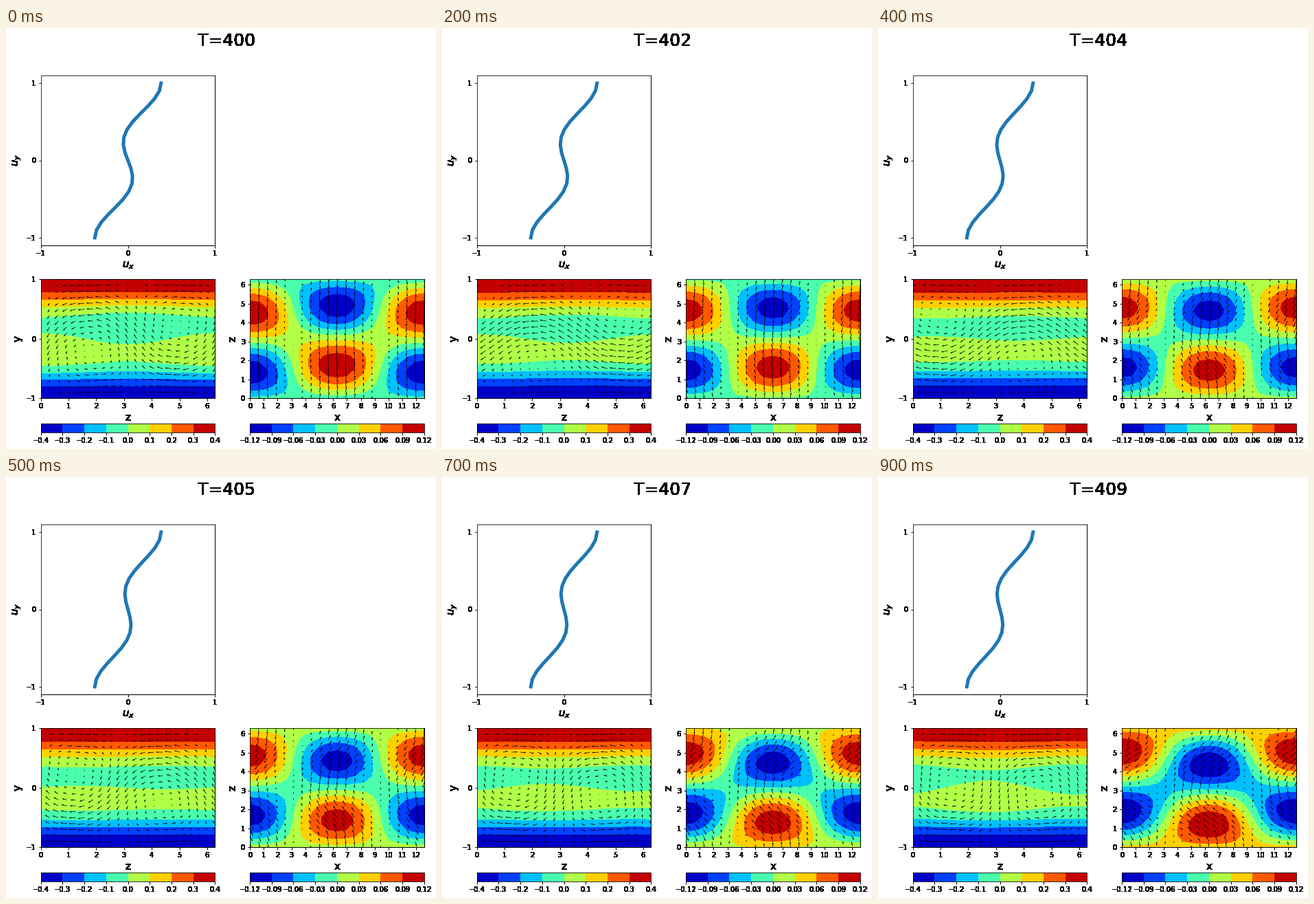
These frames come from a looping animation (626x612 px, 1000 ms). A matplotlib script:

```python
import numpy as np
import matplotlib.pyplot as plt
from matplotlib.animation import FuncAnimation
from matplotlib.cm import ScalarMappable
from matplotlib.colors import BoundaryNorm, ListedColormap

W, H, DPI = 626, 612, 72
N = 21
FRAMES, INTERVAL = 10, 100
plt.rcParams.update({"font.family": "DejaVu Sans", "font.size": 10,
                     "axes.labelsize": 15, "axes.linewidth": 0.8,
                     "xtick.major.width": 1, "ytick.major.width": 1})

x = np.linspace(0, 4 * np.pi, N)
y = np.linspace(-1, 1, N)
z = np.linspace(0, 2 * np.pi, N)
cos_mean = np.cos(x / 2).mean()  # not zero: both ends of the period are sampled

jet8 = ListedColormap(plt.cm.jet((np.arange(8) + 0.5) / 8))
u_levels = np.arange(-4, 5) * 0.1
v_levels = np.arange(-4, 5) * 0.03

fig = plt.figure(figsize=(W / DPI, H / DPI), dpi=DPI, facecolor="white")


def crisp(img, dpi):
    """Turn every touched pixel solid black."""
    img[..., :3] = 0
    img[..., 3] = img[..., 3] > 0
    return img, 0, 0


def make_crisp(*artists):
    for artist in artists:
        artist.set_agg_filter(crisp)


def add_axes(left, top, height, width=253.64):
    return fig.add_axes([left / W, 1 - (top + height) / H, width / W, height / H])


def style(ax, xlim, ylim, xticks, yticks, xlabel, ylabel):
    ax.set(xlim=xlim, ylim=ylim, xticks=xticks, yticks=yticks,
           xlabel=xlabel, ylabel=ylabel)
    make_crisp(*ax.get_xticklabels(), *ax.get_yticklabels(),
               ax.xaxis.label, ax.yaxis.label,
               ax.spines["right"], ax.spines["bottom"])


def add_colorbar(left, levels, digits):
    cax = add_axes(left, 575.45, 12.7)
    mappable = ScalarMappable(BoundaryNorm(levels, 8), jet8)
    bar = fig.colorbar(mappable, cax=cax, orientation="horizontal")
    bar.set_ticks(levels, labels=[f"{v:.{digits}f}".replace("-", "\u2212") for v in levels])
    bar.minorticks_off()
    make_crisp(*cax.get_xticklabels())


LEFT, RIGHT = 50.7, 355.06
profile_ax = add_axes(LEFT, 68.95, 247.1)
cross_ax = add_axes(LEFT, 365.45, 173)
plane_ax = add_axes(RIGHT, 365.45, 173)
style(profile_ax, (-1, 1), (-1.1, 1.1), [-1, 0, 1], [-1, 0, 1], "$u_x$", "$u_y$")
style(cross_ax, (0, z[-1]), (-1, 1), range(7), [-1, 0, 1], "z", "y")
style(plane_ax, (0, x[-1]), (0, z[-1]), range(13), range(7), "x", "z")
add_colorbar(LEFT, u_levels, 1)
add_colorbar(RIGHT, v_levels, 2)

title = fig.text(320.7 / W, 1 - 26 / H, "", fontsize=25, ha="center", va="baseline")
make_crisp(title)
profile_line, = profile_ax.plot([], [], color="#1f77b4", lw=5)
fields = []


def amplitudes(t):
    """Strength of each flow mode at time t."""
    third = -0.134 - 0.018 * np.exp(-t / 2.5)
    return dict(base=0.38 + third, third=third,
                streak=0.032 - 0.0062 * t,
                roll=-0.021 + 0.0073 * t - 0.00006 * t**2,
                span=-0.26 + 0.009 * t,
                wave=-0.034 * t + 0.001 * t**2,
                lift=-(0.111 - 0.0016 * t + 0.00016 * t**2))


def draw_field(ax, a, b, values, levels, da, db):
    fields.append(ax.contourf(a, b, values, levels=levels, colors=jet8.colors))
    fields.append(ax.quiver(a, b, da, db))


def update(t):
    while fields:
        fields.pop().remove()
    m = amplitudes(t)
    title.set_text(f"T={400 + t}")

    profile = m["base"] * np.sin(np.pi * y / 2) + m["third"] * np.sin(1.5 * np.pi * y)
    profile_line.set_data(profile, y)

    # Cross-section, averaged along x
    zz, yy = np.meshgrid(z, y)
    s, c = np.sin(np.pi * yy / 2), np.cos(np.pi * yy / 2)
    lift = m["lift"] * cos_mean
    u = profile[:, None] + c**2 * (m["streak"] * np.cos(zz)
                                   - m["wave"] * cos_mean * np.sin(zz))
    v = c * (m["roll"] * np.cos(zz) + lift * np.sin(zz))
    w = (m["span"] * cos_mean * c**2
         + s * (np.pi / 2 * m["roll"] * np.sin(zz) - 1.257 * lift * np.cos(zz)))
    draw_field(cross_ax, zz, yy, u, u_levels, w, v)

    # Mid-plane, y = 0
    xx, zz = np.meshgrid(x, z)
    cx, sx = np.cos(xx / 2), np.sin(xx / 2)
    v = m["roll"] * np.cos(zz) + m["lift"] * cx * np.sin(zz)
    u = m["streak"] * np.cos(zz) - m["wave"] * cx * np.sin(zz)
    w = m["span"] * cx + 0.5 * m["wave"] * sx * np.cos(zz)
    draw_field(plane_ax, xx, zz, v, v_levels, u, w)
    return [title, profile_line, *fields]


anim = FuncAnimation(fig, update, frames=FRAMES, interval=INTERVAL,
                     init_func=lambda: update(0), repeat=True, blit=False)
plt.show()
```
